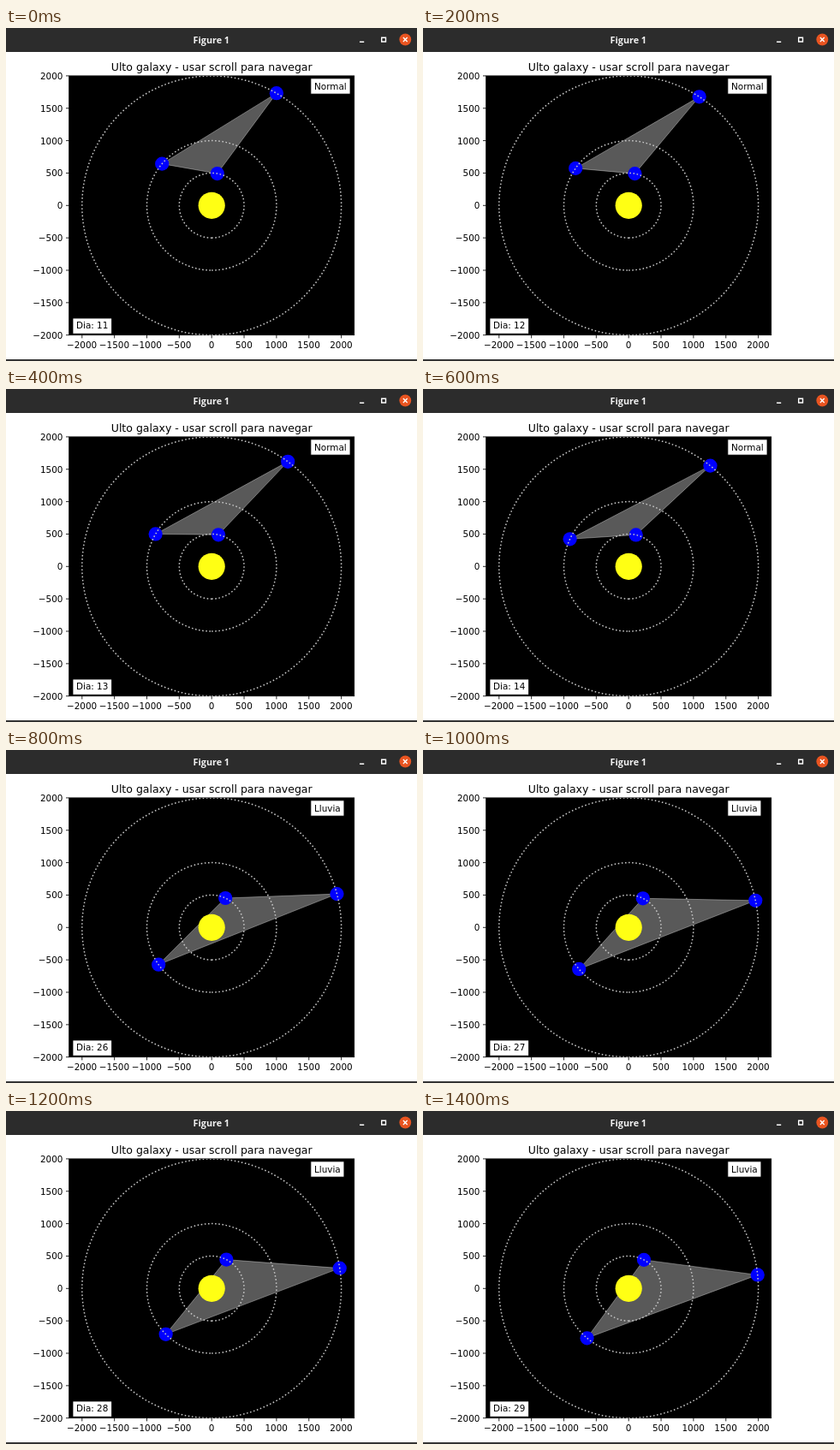
Recreate the animation shown at these times as an HTML page. Size 480 px wide and 389 px high, loop 1.6 s.

```html
<!DOCTYPE html>
<html lang="es">
<head>
<meta charset="utf-8">
<style>
html, body { margin: 0; width: 100%; height: 100%; overflow: hidden; background: #fff; }
svg { display: block; width: 100vw; height: 100vh; }
text { font: 10.42px "DejaVu Sans", sans-serif; }
.title { font-size: 12.5px; }
.bar { font: bold 10.8px "Open Sans", sans-serif; fill: #f2f2f2; }
.mid { text-anchor: middle; }
.end { text-anchor: end; }
.orbit { fill: none; stroke: #c8c8c8; stroke-width: 1.5; stroke-dasharray: 1.5625 2.578; }
.icon { fill: none; stroke: #fff; stroke-width: 1.4; }
.box { fill: #fff; stroke: #000; stroke-width: .8; }
</style>
</head>
<body>
<svg viewBox="0 0 480 389">
  <defs>
    <clipPath id="area"><rect x="73.7" y="55.9" width="333" height="302.8"/></clipPath>
  </defs>
  <rect width="480" height="389" fill="#fff"/>
  <rect width="480" height="28" fill="#2c2c2c"/>
  <text class="bar mid" x="239.8" y="18.3">Figure 1</text>
  <path class="icon" d="M413 16.3h5.2M438.7 11.2h4.8v4.8h-4.8z"/>
  <circle cx="466.3" cy="13.5" r="6.9" fill="#e95420"/>
  <path class="icon" d="M463.9 11.1l4.8 4.8m0-4.8l-4.8 4.8"/>
  <rect y="387" width="480" height="2" fill="#333"/>

  <text class="title mid" x="240.2" y="49.6">Ulto galaxy - usar scroll para navegar</text>
  <rect x="73.7" y="55.9" width="333" height="302.8" stroke="#000" stroke-width=".8"/>
  <g id="axes"></g>
  <g clip-path="url(#area)">
    <polygon id="triangle" fill="#fff" fill-opacity=".35" stroke="#fff" stroke-opacity=".35"/>
    <circle cx="240.2" cy="207.3" r="15.6" fill="#ffff14"/>
    <g id="planets" fill="#00f"></g>
    <g id="orbits"></g>
  </g>
  <rect id="weatherBox" class="box" x="355.9" y="58.9" height="18.2"/>
  <text id="weather" x="360" y="71.5"></text>
  <rect class="box" x="78" y="339" width="45.6" height="18.2"/>
  <text id="day" x="82" y="351.3"></text>
</svg>
<script>
const CX = 240.2, CY = 207.3, UNIT = 0.0757;
const DAYS = [11, 12, 13, 14, 26, 27, 28, 29];
const STEP = 200;
// angle in degrees = start + speed * day
const PLANETS = [
  { radius: 500, start: 91, speed: -1 },
  { radius: 1000, start: 85, speed: 5 },
  { radius: 2000, start: 93, speed: -3 }
];
const $ = id => document.getElementById(id);

function add(parent, name, attrs, text = '') {
  const el = document.createElementNS('http://www.w3.org/2000/svg', name);
  for (const key in attrs) el.setAttribute(key, attrs[key]);
  el.textContent = text;
  return $(parent).appendChild(el);
}

for (let v = -2000; v <= 2000; v += 500) {
  const x = CX + v * UNIT, y = CY - v * UNIT;
  const label = String(v).replace('-', '\u2212');
  add('axes', 'path', { d: `M${x} 358.7v3.7M73.7 ${y}h-3.7`, stroke: '#000', 'stroke-width': 0.85 });
  add('axes', 'text', { class: 'mid', x: x - 0.2, y: 373.9 }, label);
  add('axes', 'text', { class: 'end', x: 66.4, y: y + 4 }, label);
}

for (const p of PLANETS) {
  const r = p.radius * UNIT;
  add('orbits', 'path', {
    class: 'orbit',
    d: `M${CX} ${CY + r}a${r} ${r} 0 0 0 0 ${-2 * r}a${r} ${r} 0 0 0 0 ${2 * r}`
  });
  p.dot = add('planets', 'circle', { r: 8.1 });
}

function show(day) {
  const points = PLANETS.map(p => {
    const a = (p.start + p.speed * day) * Math.PI / 180;
    const x = CX + p.radius * UNIT * Math.cos(a);
    const y = CY - p.radius * UNIT * Math.sin(a);
    p.dot.setAttribute('cx', x);
    p.dot.setAttribute('cy', y);
    return [x, y];
  });
  const rain = day > 20;
  $('triangle').setAttribute('points', points.join(' '));
  $('day').textContent = 'Dia: ' + day;
  $('weather').textContent = rain ? 'Lluvia' : 'Normal';
  $('weatherBox').setAttribute('width', rain ? 39 : 46.1);
}

const begin = performance.now();
function frame() {
  const step = Math.floor((performance.now() - begin) / STEP);
  show(DAYS[step % DAYS.length]);
  requestAnimationFrame(frame);
}
frame();
</script>
</body>
</html>
```
